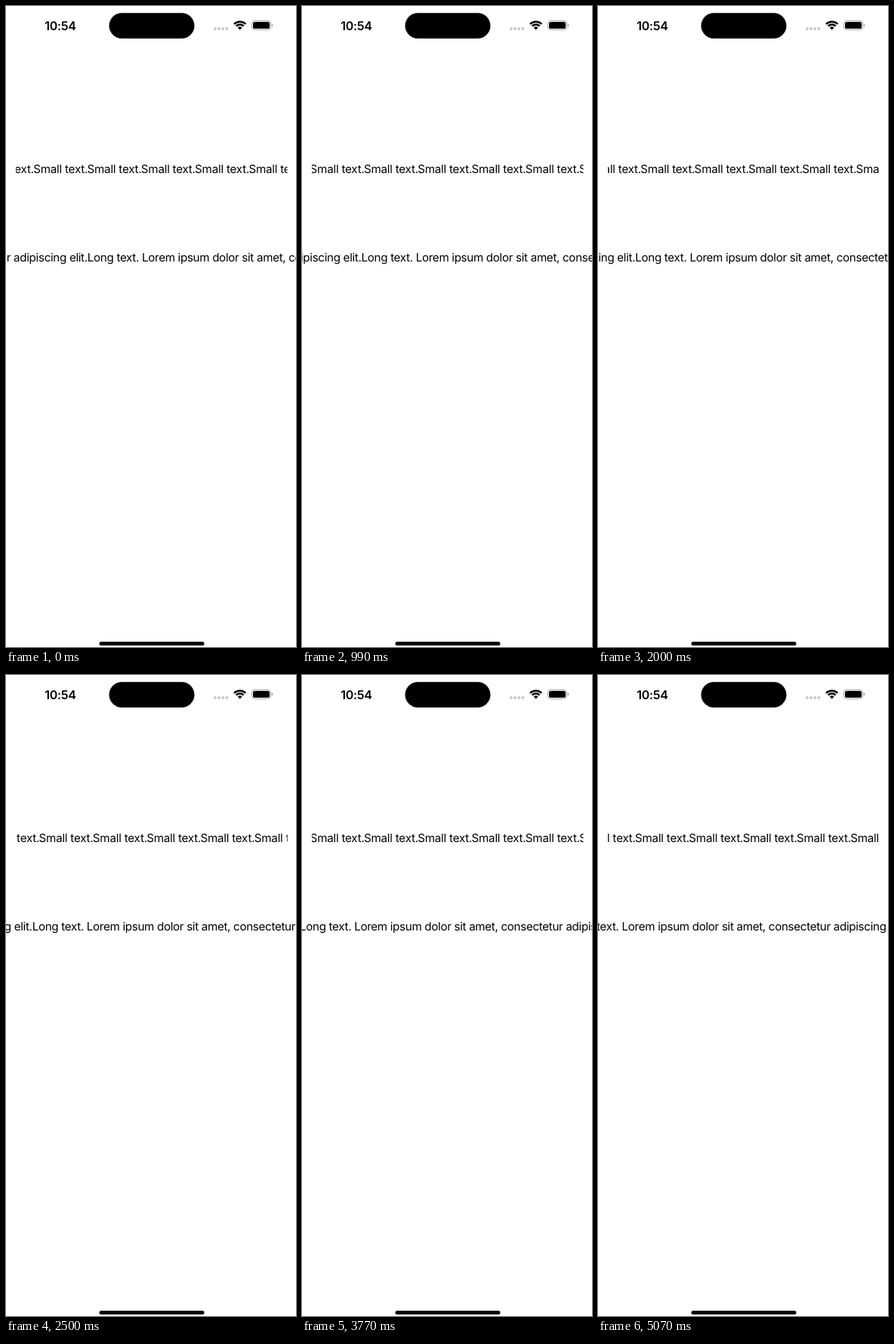
An HTML page that plays this animation: 384x848 px, repeating every 5.12 s.

```html
<!DOCTYPE html>
<html lang="en">
<head>
<meta charset="utf-8">
<title>Marquee</title>
<style>
  html, body { margin: 0; height: 100%; overflow: hidden; background: #fff; }
  svg { display: block; width: 384px; height: 848px; }
  text {
    font-family: Inter, "Liberation Sans", sans-serif;
    font-size: 15.2px;
    letter-spacing: -0.33px;
    text-rendering: geometricPrecision;
    white-space: pre;
  }
  #small text { letter-spacing: -0.23px; }
  .clock { font-size: 16px; font-weight: 600; letter-spacing: -0.3px; }
</style>
</head>
<body>
<svg viewBox="0 0 384 848">
  <clipPath id="box"><rect x="13" y="195" width="359.6" height="40"/></clipPath>

  <text class="clock" x="72" y="31.8" text-anchor="middle">10:54</text>
  <rect x="136.5" y="9.3" width="113" height="33.7" rx="16.85"/>

  <g fill="#c6c6c6">
    <circle cx="277" cy="30" r="1.9"/>
    <circle cx="282.1" cy="30" r="1.9"/>
    <circle cx="287.2" cy="30" r="1.9"/>
    <circle cx="292.3" cy="30" r="1.9"/>
  </g>

  <g transform="translate(309.7 31.6)" fill="none" stroke="#000" stroke-width="2.4">
    <path d="M-7.7-7.7A10.9 10.9 0 0 1 7.7-7.7"/>
    <path d="M-5-5A7.1 7.1 0 0 1 5-5"/>
    <path d="M0 0L-2.9-2.9A4.1 4.1 0 0 1 2.9-2.9Z" fill="#000" stroke="none"/>
  </g>

  <rect x="325.4" y="19.4" width="25.4" height="12.2" rx="3.9" fill="none" stroke="#a8a8a8"/>
  <rect x="327" y="21" width="22.2" height="9" rx="2.6"/>
  <path d="M352 23.4q1.5.6 1.5 2.1t-1.5 2.1z" fill="#a8a8a8"/>

  <g clip-path="url(#box)"><g id="small"></g></g>
  <g id="long"></g>

  <rect x="123.5" y="841" width="139" height="5" rx="2.5"/>
</svg>
<script>
const LOOP = 5120, STEPS = 72, LEAD = 8;
const PITCH = 71.3;
const SENTENCE = 'Long text. Lorem ipsum dolor sit amet, consectetur adipiscing elit.';

const small = document.getElementById('small');
const long = document.getElementById('long');

function addText(parent, str, x, y, anchor = 'start') {
  const el = document.createElementNS('http://www.w3.org/2000/svg', 'text');
  el.textContent = str;
  el.setAttribute('x', x);
  el.setAttribute('y', y);
  el.setAttribute('text-anchor', anchor);
  parent.append(el);
}

for (let i = -1; i < 8; i++) addText(small, 'Small text.', i * PITCH, 220.5);
addText(long, SENTENCE, 0, 337.5, 'end');
addText(long, SENTENCE, 0, 337.5);

// Rows scroll left at a constant speed, in px per second.
const rows = [
  { el: small, start: 36.2, speed: 25.7 },
  { el: long, start: 107.8, speed: 29.4 }
];

function draw() {
  const step = Math.floor((performance.now() + LEAD) % LOOP / LOOP * STEPS);
  const sec = step * LOOP / STEPS / 1000;
  for (const { el, start, speed } of rows) {
    el.setAttribute('transform', `translate(${(start - speed * sec).toFixed(2)} 0)`);
  }
  requestAnimationFrame(draw);
}
draw();
</script>
</body>
</html>
```
